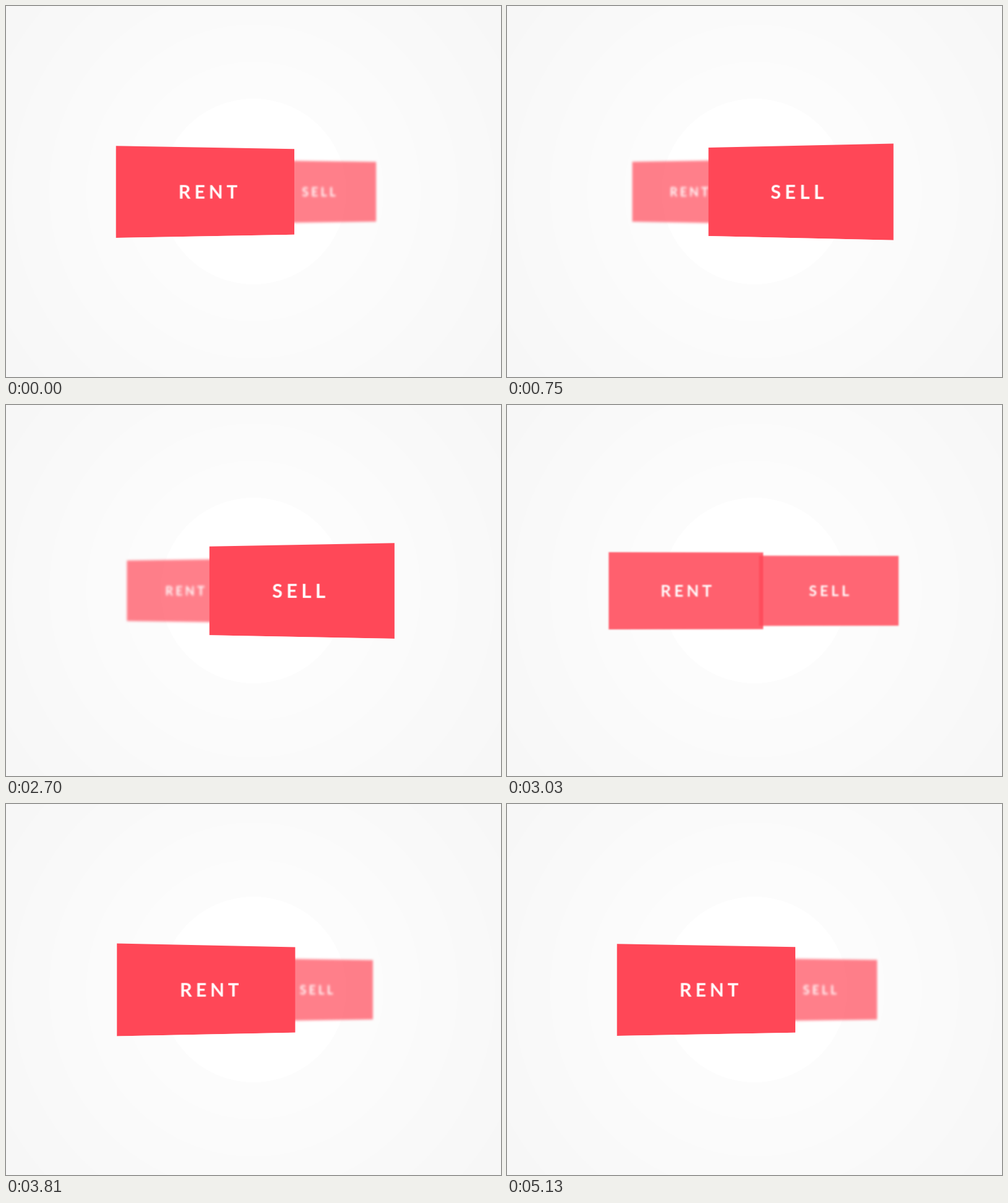
Recreate the animation shown at these times as an HTML page. Size 800 px wide and 600 px high, loop 5400 ms.

```html
<!DOCTYPE html>
<html lang="en">
<head>
<meta charset="utf-8">
<title>Rent / Sell</title>
<style>
  html, body { margin: 0; width: 100%; height: 100%; overflow: hidden; }
  .stage {
    position: relative; width: 800px; height: 600px; overflow: hidden;
    perspective: 690px;
    background: radial-gradient(circle at 400px 300px,
      #fff 150px, #fcfcfc 150px 210px, #fbfbfb 210px 270px, #fafafa 270px 330px,
      #f9f9f9 330px 390px, #f8f8f8 390px 450px, #f7f7f7 450px);
  }
  .pivot { position: absolute; left: 400px; top: 300px; transform-style: preserve-3d; }
  .card {
    position: absolute; left: -125px; top: -62.5px; width: 250px; height: 125px;
    background: #ff4757; color: #fff; text-align: center; text-indent: .2em;
    font: 700 26px/125px Lato, sans-serif; letter-spacing: .2em;
  }
</style>
</head>
<body>
<div class="stage">
  <div class="pivot" id="pivot">
    <div class="card" id="rent">RENT</div>
    <div class="card" id="sell">SELL</div>
  </div>
</div>
<script>
  const HALF = 2700, TILT = 10, BLUR = 2.5, FADE = 0.3;
  const ARRIVE = 565, LEAVE = 545;

  // Springy swing of the pivot: [ms, progress]
  const SWING = [
    [0, 0], [100, .1], [200, .28], [330, .56], [570, .87], [750, 1.095],
    [870, 1.13], [1000, 1.11], [1170, 1.045], [1320, .985], [1420, .98],
    [1590, 1.012], [1720, 1.01], [1900, .998], [2100, 1.002], [2400, 1]
  ];

  // Resting places [x, z] inside the pivot
  const cards = {
    rent: { el: document.getElementById('rent'), front: [-78, 76.6], back: [-165.8, -143.5] },
    sell: { el: document.getElementById('sell'), front: [79.4, 98.7], back: [163.1, -156] }
  };
  const pivot = document.getElementById('pivot');

  const clamp = v => Math.min(1, Math.max(0, v));
  const mix = (a, b, k) => a + (b - a) * k;
  const smooth = v => { const u = clamp(v); return u * u * (3 - 2 * u); };

  function slope(i) {
    if (i === 0 || i === SWING.length - 1) return 0;
    const a = SWING[i - 1], b = SWING[i + 1];
    return (b[1] - a[1]) / (b[0] - a[0]);
  }

  function swing(t) {
    const i = SWING.findIndex(k => k[0] > t) - 1;
    if (i < 0) return 1;
    const [t0, a] = SWING[i], [t1, b] = SWING[i + 1];
    const d = t1 - t0, u = (t - t0) / d, v = 1 - u;
    return a * v * v * (1 + 2 * u) + b * u * u * (3 - 2 * u)
      + d * u * v * (slope(i) * v - slope(i + 1) * u);
  }

  // move and fade run from 0 (back) to 1 (front)
  function place({ el, front, back }, move, fade) {
    const x = mix(back[0], front[0], move), z = mix(back[1], front[1], move);
    const blur = BLUR * (1 - move);
    el.style.transform = `translate3d(${x}px, 0, ${z}px)`;
    el.style.opacity = 1 - FADE * (1 - fade);
    el.style.filter = blur > 0.01 ? `blur(${blur}px)` : 'none';
  }

  function draw(now) {
    const time = now % (2 * HALF), toSell = time < HALF, t = time % HALF;
    const q = swing(t), fade = clamp(q);
    const [next, prev] = toSell ? [cards.sell, cards.rent] : [cards.rent, cards.sell];
    const angle = (toSell ? 1 : -1) * TILT * (1 - 2 * q);
    pivot.style.transform = `rotateY(${angle}deg)`;
    place(next, smooth(t / ARRIVE), fade);
    place(prev, 1 - smooth(t / LEAVE), 1 - fade);
  }

  const start = performance.now();
  function tick() {
    draw(performance.now() - start);
    requestAnimationFrame(tick);
  }
  tick();
</script>
</body>
</html>
```
